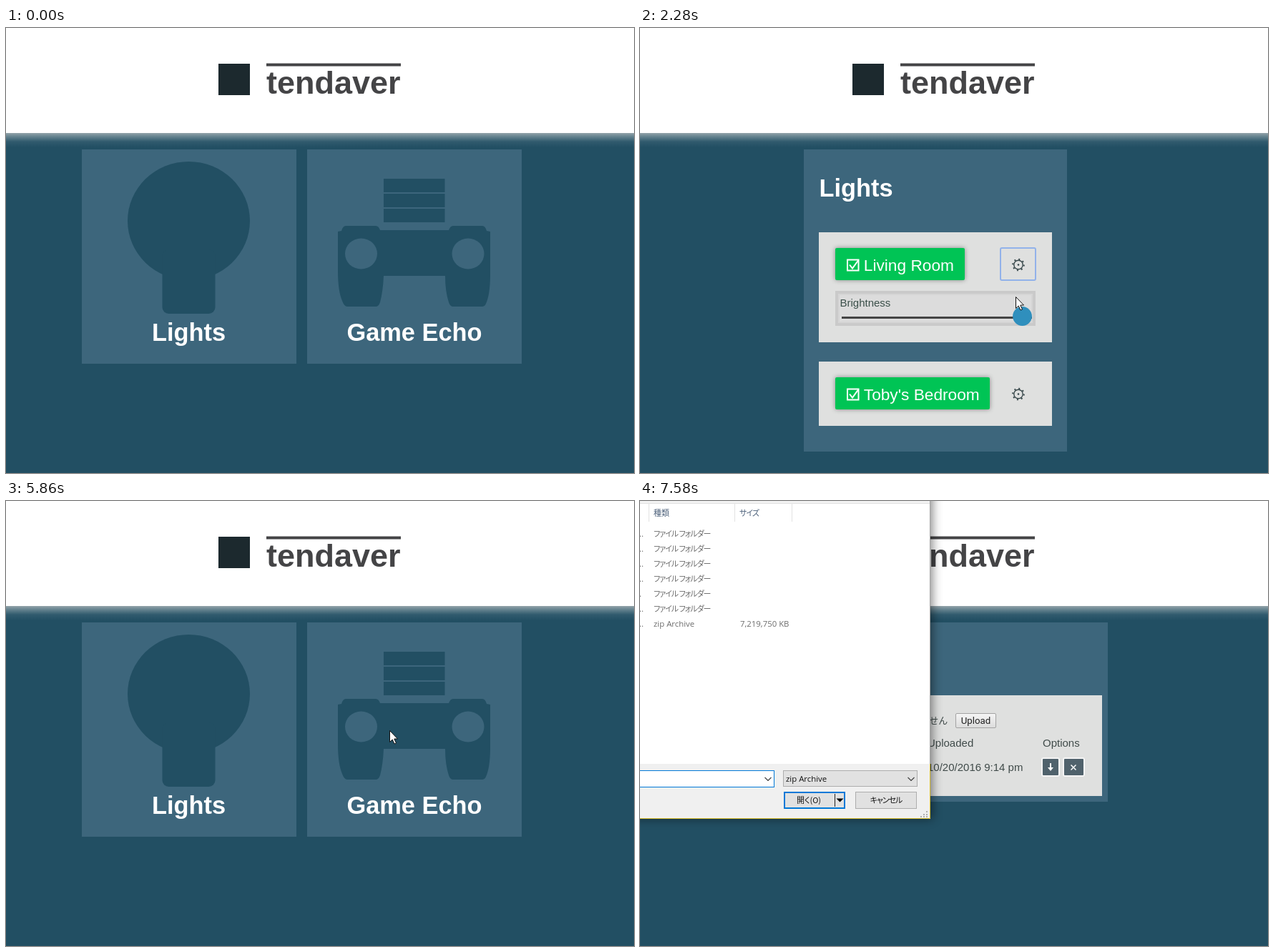
An HTML page for the animation above (7990 ms loop, 878x623 px).

```html
<!DOCTYPE html>
<html lang="en">
<head>
<meta charset="utf-8">
<title>Home panel</title>
<style>
html, body { margin: 0; width: 100%; height: 100%; overflow: hidden; background: #224f63; }
svg { display: block; width: 100vw; height: 100vh; }
text { font: 15px "Liberation Sans", Arial, sans-serif; fill: #404b4a; }
.brand { font-size: 45px; font-weight: bold; fill: #444446; }
.title { font-size: 34.4px; font-weight: bold; fill: #fff; }
.mid { text-anchor: middle; }
.label { font-size: 22.7px; fill: #fff; }
.jp { font: 13px "Noto Sans CJK JP", "Noto Sans CJK", sans-serif; }
.ui { font: 13.3px Roboto, sans-serif; fill: #222; }
#dialog text { font: 11.4px "Open Sans", sans-serif; fill: #6d6d6d; }
#dialog .jp { font: 11px "Noto Sans CJK JP", "Noto Sans CJK", sans-serif; font-feature-settings: "palt"; letter-spacing: -1px; }
#dialog .head { fill: #4c607a; letter-spacing: 0; }
#dialog .dark { fill: #111; }
.panel { fill: #3d667c; }
.card { fill: #dfe0df; }
.bg { fill: #224f63; }
.on { fill: #00c455; }
.off { fill: #045a85; }
.glow { filter: drop-shadow(0 0 3px #0006); }
.line { fill: none; stroke: #fff; stroke-width: 2; }
.gear { fill: none; stroke: #37474a; stroke-width: 1.4; }
</style>
</head>
<body>
<svg viewBox="0 0 878 623">
  <defs>
    <linearGradient id="fade" x2="0" y2="1">
      <stop stop-color="#93a3aa"/><stop offset=".25" stop-color="#65838f"/>
      <stop offset=".6" stop-color="#315b6e"/><stop offset="1" stop-color="#224f63"/>
    </linearGradient>
    <linearGradient id="grey" x2="0" y2="1"><stop stop-color="#f5f5f5"/><stop offset="1" stop-color="#dcdcdc"/></linearGradient>
    <g id="gear" class="gear">
      <circle r="6.2"/>
      <circle r="7.8" stroke-width="2" stroke-dasharray="2 4.126"/>
      <circle r="1.3" fill="#37474a" stroke="none"/>
    </g>
    <path id="box" class="line" d="M290 324.500h15.500v15h-15.500z"/>
    <path id="tick" class="line" d="M293 331.500l4 5 8-11"/>
  </defs>

  <rect class="bg" width="878" height="623"/>
  <rect width="878" height="147" fill="#fff"/>
  <rect y="147" width="878" height="20" fill="url(#fade)"/>
  <rect x="297" y="50" width="44" height="44" fill="#1c292e"/>
  <rect x="364" y="49.500" width="188" height="4" fill="#444446"/>
  <text class="brand" x="364" y="91.500">tendaver</text>

  <g id="home">
    <path class="panel" d="M106 170h300v300h-300zM421 170h300v300h-300z"/>
    <ellipse class="bg" cx="255.500" cy="270" rx="85.500" ry="83"/>
    <rect class="bg" x="218.500" y="310" width="74" height="90" rx="9"/>
    <text class="title mid" x="255.500" y="438">Lights</text>
    <path class="bg" d="M528 211h85.500v19H528zM528 232h85.500v19H528zM528 253h85.500v19H528z
      M464 285l5-1q2-7 6-7H517q4 0 6 6H619q2-6 6-6H666q4 0 6 7l5 1V345q0 30-7 43-2 2-4 2H625q-4 0-6-6-5-15-5-37H528
      q-1 22-5 37-2 6-6 6H477q-4 0-7-8Q464 368 464 340z"/>
    <ellipse class="panel" cx="496.500" cy="316" rx="22.500" ry="21.500"/>
    <ellipse class="panel" cx="646" cy="316" rx="22.500" ry="21.500"/>
    <text class="title mid" x="571" y="438">Game Echo</text>
  </g>

  <g id="lightsEmpty">
    <rect class="panel" x="347" y="170" width="132" height="125"/>
    <text class="title" x="368.500" y="236">Lights</text>
  </g>

  <g id="lights">
    <rect id="lightsPanel" class="panel" x="229" y="170" width="368"/>
    <text class="title" x="250.500" y="236">Lights</text>
    <rect id="roomCard" class="card" x="250" y="286" width="326"/>
    <rect class="on glow" x="273" y="308" width="181" height="45" rx="2"/>
    <use href="#box"/><use href="#tick"/>
    <text class="label" x="312.800" y="340">Living Room</text>
    <use href="#gear" x="529" y="331.500"/>
    <rect id="ring" x="504" y="308" width="49" height="45" rx="2" fill="none" stroke="#92b2ea" stroke-width="2"/>
    <g id="slider">
      <rect x="275" y="370" width="276" height="45" fill="#dcdcdc" stroke="#cacaca" stroke-width="4"/>
      <rect x="278" y="373" width="270" height="39" fill="none" stroke="#d5d5d5" stroke-width="2"/>
      <text x="279.500" y="390" style="fill:#3a4f49">Brightness</text>
      <rect x="282" y="404" width="266" height="3" fill="#444"/>
      <circle id="thumb" cy="403.500" r="13.400" fill="#2f8fbd"/>
    </g>
    <g id="bedroom">
      <rect class="card" x="250" y="286" width="326" height="90"/>
      <rect id="toggle" class="glow" x="273" y="308" width="216" height="45" rx="2"/>
      <use href="#box"/><use id="bedTick" href="#tick"/>
      <text class="label" x="312.800" y="340">Toby's Bedroom</text>
      <use href="#gear" x="529" y="331.500"/>
    </g>
  </g>

  <g id="gameEmpty">
    <rect class="panel" x="304" y="170" width="219" height="125"/>
    <text class="title" x="325.500" y="236">Game Echo</text>
  </g>

  <g id="game">
    <rect class="panel" x="173" y="170" width="481" height="251"/>
    <text class="title" x="194.300" y="236">Game Echo</text>
    <rect class="card" x="180" y="272" width="466" height="141"/>
    <rect id="choose" x="203.500" y="295.500" width="106" height="25" rx="1.500" fill="url(#grey)"/>
    <text class="jp" x="211" y="312">ファイルを選択</text>
    <text class="jp" x="314" y="312">選択されていません</text>
    <rect x="441.500" y="297.500" width="56" height="20" rx="1.500" fill="url(#grey)" stroke="#a3a3a3"/>
    <text class="ui mid" x="469.500" y="312">Upload</text>
    <text x="206" y="344">Game</text><text x="321" y="344">Size</text>
    <text x="402" y="344">Uploaded</text><text x="563" y="344">Options</text>
    <text x="205" y="378">Reef of Kelvi</text><text x="321" y="378">7.39 gb</text>
    <text x="402" y="378">10/20/2016 9:14 pm</text>
    <g fill="#50626c" stroke="#f4f4f4" stroke-width="2">
      <rect x="562" y="360" width="24" height="25" rx="2"/><rect x="592" y="360" width="29" height="25" rx="2"/>
    </g>
    <path d="M573 367h2v6h3l-4 5-4-5h3z" fill="#fff"/>
    <path class="line" style="stroke-width:1.500" d="M602.500 369.500l7 7m0-7l-7 7"/>
  </g>

  <g id="dialog">
    <rect x="-40" y="-20" width="446" height="465" fill="#fff" style="filter:drop-shadow(3px 0 7px #0007)"/>
    <path d="M-40-20H405V3H-40z" fill="#f2f2f2"/>
    <path d="M-40 3.500H405M12.500 4V29M132.500 4V29M212.500 4V29" stroke="#e2e2e2"/>
    <text class="jp head" x="19" y="21">種類</text><text class="jp head" x="139" y="21" style="letter-spacing:-1px">サイズ</text>
    <g id="files"></g>
    <path d="M-40 368H405V444H-40z" fill="#f0f0f0"/>
    <path d="M-40 444.500H405.500V-20" fill="none" stroke="#d8bd2c"/>
    <path d="M405.500 368V-20" stroke="#a5a5a5"/>
    <rect x="-20" y="377.500" width="207.500" height="23" fill="#fff" stroke="#0078d7"/>
    <rect x="200.500" y="377.500" width="187" height="22" fill="#e1e1e1" stroke="#adadad"/>
    <path d="M174.500 387l4.500 4.500 4.500-4.500M374.500 387l4.500 4.500 4.500-4.500" fill="none" stroke="#444" stroke-width="1.200"/>
    <text class="dark" x="204" y="393">zip Archive</text>
    <rect x="202" y="408" width="84" height="22" fill="#e1e1e1" stroke="#0078d7" stroke-width="2"/>
    <path d="M272.500 410V428" stroke="#222"/>
    <path d="M274.500 416.500h10l-5 5z"/>
    <text class="jp dark mid" x="236" y="423" style="letter-spacing:0">開く(O)</text>
    <rect x="301.500" y="407.500" width="85" height="23" fill="#e1e1e1" stroke="#adadad"/>
    <text class="jp dark mid" x="344" y="423">キャンセル</text>
    <path d="M400 435h2m-6 4h2m2 0h2m-10 3h2m2 0h2m2 0h2" stroke="#b0b0b0" stroke-width="2"/>
  </g>

  <path id="cursor" d="M.5.500V16.500L4.200 13 7 19 9.500 18 6.800 12H11.500z" fill="#fff" stroke="#111"/>
</svg>
<script>
const LOOP = 7990;
const el = id => document.getElementById(id);
const show = (id, on) => el(id).style.display = on ? '' : 'none';
const set = (id, attrs) => { for (const k in attrs) el(id).setAttribute(k, attrs[k]); };
const between = (t, a, b) => t >= a && t < b;
const progress = (t, a, b) => {
  const p = Math.min(1, Math.max(0, (t - a) / (b - a)));
  return p * p * (3 - 2 * p);
};

// start, end, then start point, control point and end point of each pointer stroke
const strokes = [
  [290, 860, 330, 623, 270, 470, 229, 340],
  [1230, 1850, 229, 340, 390, 350, 549, 335],
  [2050, 2510, 549, 335, 507.5, 381, 536, 407],
  [2660, 3020, 536, 407, 476, 407, 417, 407],
  [3200, 3580, 417, 407, 572, 440, 499, 514],
  [3760, 3990, 492, 519, 482, 528, 470, 531],
  [4190, 4890, 470, 531, 440, 300, 388, 91],
  [5170, 5200, 388, 90, 388, 90, 388, 90],
  [5450, 5900, 388, 90, 470, 200, 539, 326],
  [6140, 6680, 539, 326, 400, 314, 268, 310]
];

function pointer(t) {
  const [a, b, x0, y0, cx, cy, x1, y1] = strokes.findLast(s => t >= s[0]);
  const p = progress(t, a, b), q = 1 - p;
  const mix = (u, c, v) => q * q * u + 2 * p * q * c + p * p * v;
  return [mix(x0, cx, x1), mix(y0, cy, y1)];
}

const row = (i, kind, cls, dots) =>
  `<text x="-1" y="${50 + 21 * i}">${dots}</text><text class="${cls}" x="19" y="${50 + 21 * i}">${kind}</text>`;
el('files').innerHTML =
  [...'222212'].map((n, i) => row(i, 'ファイル フォルダー', 'jp', '.'.repeat(n))).join('') +
  row(6, 'zip Archive', '', '..') + '<text x="140" y="176">7,219,750 KB</text>';

function draw(t) {
  show('home', t < 950 || between(t, 5250, 5940));
  show('lightsEmpty', between(t, 950, 1000));
  show('lights', between(t, 1000, 5250));
  show('gameEmpty', between(t, 5940, 5990));
  show('game', t >= 5990);

  const open = t >= 1900, extra = open ? 64 : 0, lit = t < 4190;
  set('lightsPanel', { height: 359 + extra });
  set('roomCard', { height: 90 + extra });
  set('bedroom', { transform: `translate(0 ${117 + extra})` });
  show('slider', open);
  show('ring', between(t, 1900, 2660));
  set('thumb', { cx: 534.5 - 115.5 * progress(t, 2660, 3020) });
  set('toggle', { class: 'glow ' + (lit ? 'on' : 'off') });
  show('bedTick', lit);
  set('choose', { stroke: t >= 6830 ? '#666' : '#a3a3a3' });

  const fade = progress(t, 7200, 7400), size = 0.94 + 0.06 * fade;
  show('dialog', t >= 7200);
  set('dialog', { opacity: fade, transform: `translate(100 222) scale(${size}) translate(-100 -222)` });
  show('files', t >= 7450);

  const moving = between(t, 290, 7200);
  show('cursor', moving);
  if (moving) set('cursor', { transform: `translate(${pointer(t).map(Math.round)})` });
}

function tick() {
  draw(performance.now() % LOOP);
  requestAnimationFrame(tick);
}
tick();
</script>
</body>
</html>
```
